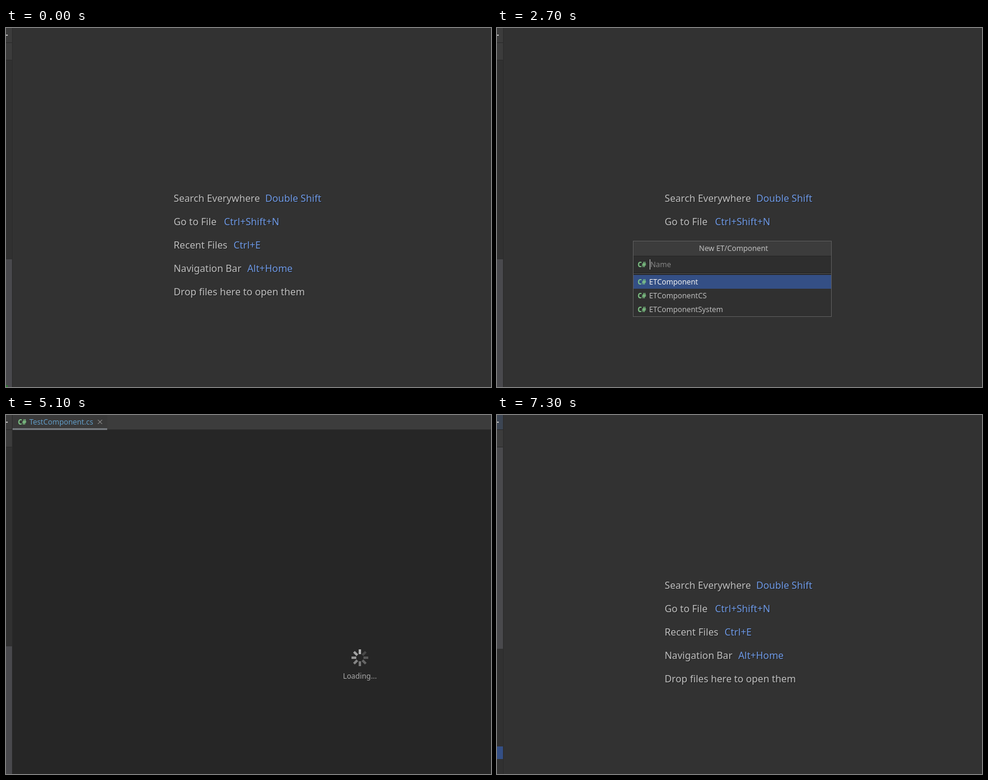
Animation of 810x599 px, one loop 8 s. Source, as an HTML page with a canvas:

```html
<!DOCTYPE html>
<html lang="en">
<head>
<meta charset="utf-8">
<title>New component</title>
<style>
html, body { margin: 0; width: 100%; height: 100%; overflow: hidden; background: #323232; }
canvas { display: block; width: 810px; height: 599px; }
</style>
</head>
<body>
<canvas id="stage" width="810" height="599"></canvas>
<script>
const g = document.getElementById('stage').getContext('2d');
const LOOP = 8000;
const SANS = '"Noto Sans", "Open Sans", sans-serif';
const MONO = '"Noto Sans Mono", "DejaVu Sans Mono", monospace';
const UI = `12.3px ${SANS}`;
const CODE = `13.333px ${MONO}`;
const GREY = '#bbbbbb', BLUE = '#6c95eb', PURPLE = '#b796fa', ICON = '#aeb3b8';

function rect(x, y, w, h, color) {
  g.fillStyle = color;
  g.fillRect(x, y, w, h);
}

function frame(x, y, w, h, color) {
  g.strokeStyle = color;
  g.lineWidth = 1;
  g.strokeRect(x + .5, y + .5, w - 1, h - 1);
}

function text(s, x, y, color = GREY, font = UI, align = 'left') {
  g.font = font;
  g.textAlign = align;
  g.fillStyle = color;
  g.fillText(s, x, y);
}

function path(points, color, width = 1, close = false) {
  g.beginPath();
  points.forEach(([x, y], i) => i ? g.lineTo(x, y) : g.moveTo(x, y));
  if (close) g.closePath();
  g.strokeStyle = color;
  g.lineWidth = width;
  g.stroke();
}

function disc(x, y, r, color) {
  g.beginPath();
  g.arc(x, y, r, 0, Math.PI * 2);
  g.fillStyle = color;
  g.fill();
}

function sharp(x, y) {
  text('C#', x, y, '#84cf8c', `bold 11.8px ${MONO}`);
}

// Left edge of the neighbouring tool window
function strip(t) {
  const focused = (t >= 400 && t < 1400) || t >= 7200;
  rect(0, 0, 10, 24, focused ? '#3c4553' : '#3c3c3c');
  rect(0, 11, 3, 2, '#b4b4b4');
  rect(0, 24, 10, 1, '#2a2a2a');
  rect(0, 25, 10, 28, '#3c3c3c');
  rect(0, 53, 10, 1, '#2a2a2a');
  rect(0, 54, 10, 545, '#313131');
  if (t >= 7300) {
    rect(0, 54, 10, 336, '#49494c');
    rect(0, 553, 10, 21, '#344f85');
  } else {
    const top = t >= 5400 && t < 6900 ? 383 : 386;
    rect(0, top, 10, 599 - top, '#49494d');
  }
  if (t < 400) rect(0, 596, 3, 3, '#2f7a35');
  rect(10, 0, 1, 599, '#2b2b2b');
}

const hints = [
  ['Search Everywhere', 'Double Shift', 433],
  ['Go to File', 'Ctrl+Shift+N', 364],
  ['Recent Files', 'Ctrl+E', 380],
  ['Navigation Bar', 'Alt+Home', 403],
  ['Drop files here to open them', '', 0]
];

function welcome() {
  const font = `16.2px ${SANS}`;
  const shaded = (s, x, y, color) => {
    text(s, x + 1, y + 1, '#1d1d1d', font);
    text(s, x, y, color, font);
  };
  hints.forEach(([label, key, x], i) => {
    const y = 290 + i * 39;
    shaded(label, 280, y, '#c0c0c0');
    shaded(key, x, y, '#6f9ae6');
  });
}

function page(y, filled) {
  if (filled) {
    rect(256, y - 6, 7, 13, ICON);
    rect(253, y - 3, 10, 10, ICON);
    for (let i = 0; i < 3; i++) rect(255, y - 1 + i * 3, 6, 1, '#303030');
  } else {
    path([[254, y - 5], [259, y - 5], [262, y - 2], [262, y + 5], [254, y + 5]], '#d0d0d0', 1.6, true);
    path([[259, y - 5], [259, y - 2], [262, y - 2]], '#d0d0d0');
  }
}

function shader(y) {
  disc(258, y, 7, '#c6c6c6');
  g.save();
  g.beginPath();
  g.arc(258, y, 6, 0, Math.PI * 2);
  g.clip();
  for (let i = -2; i <= 2; i++)
    for (let j = -2; j <= 2; j++)
      if ((i + j) % 2) rect(256.5 + i * 3, y - 1.5 + j * 3, 3, 3, '#303030');
  g.restore();
}

const icons = {
  sharp: y => sharp(251, y + 5),
  brand: y => disc(258, y, 6, '#c6c6c6'),
  shader,
  json: y => page(y, false),
  table(y) {
    frame(251, y - 6, 14, 11, ICON);
    for (let i = 0; i < 3; i++) {
      rect(253, y - 4 + i * 3, 2, 1, ICON);
      rect(256, y - 4 + i * 3, 7, 1, ICON);
    }
  },
  file: y => page(y, true),
  scratch(y) {
    page(y, true);
    disc(262, y - 4, 4, '#4a78c4');
    path([[262, y - 6], [262, y - 4], [264, y - 4]], '#e0e0e0');
  },
  folder(y) {
    rect(252, y - 5, 6, 3, ICON);
    rect(252, y - 3, 12, 9, ICON);
    rect(259, y + 1, 7, 7, '#303030');
    rect(262, y + 1, 2, 6, ICON);
    rect(260, y + 3, 6, 2, ICON);
  }
};

const menuItems = [
  ['Add Existing Item...', 347],
  ['Class/Interface', 372, 'sharp'],
  ['ET/Component', 392, 'sharp'],
  ['ET/Entity', 412, 'sharp'],
  ['ET/Server', 432, 'sharp'],
  ['Ovrel Script', 457, 'brand'],
  ['Ovrel Shader', 477, 'shader'],
  ['appsettings.json File', 502, 'json'],
  ['Resources (.resx)', 527, 'table'],
  ['File', 552, 'file'],
  ['New Scratch File', 572, 'scratch'],
  ['Directory', 592, 'folder']
];

function panel(x, y, w, h, title) {
  rect(x, y, w, h, '#303030');
  rect(x, y, w, 25, '#3c3c3c');
  rect(x, y + 25, w, 1, '#272727');
  frame(x, y, w, h, '#5c5c5c');
  text(title, x + w / 2 + 2, y + 17, '#c0c0c0', UI, 'center');
}

function menu(selected) {
  panel(237, 308, 298, 310, 'New in This Directory');
  for (const y of [359, 444, 489, 514, 539]) rect(238, y, 296, 1, '#3a3a3a');
  menuItems.forEach(([label, y, icon], i) => {
    const on = i === selected;
    if (on) rect(238, y - 10, 296, 20, '#344f85');
    if (icon) icons[icon](y);
    text(label, 272, y + 4, on ? '#f0f0f0' : GREY);
  });
  text('Ctrl+Alt+Shift+Insert', 395, 576, '#8c8c8c');
}

function dialog(t) {
  panel(227, 355, 332, 127, 'New ET/Component');
  rect(228, 381, 330, 27, '#2e2e2e');
  rect(228, 408, 330, 1, '#1f1f1f');
  rect(228, 409, 330, 1, '#4a4a4a');
  rect(228, 411, 330, 1, '#262626');
  sharp(235, 399);
  const typed = t >= 3900;
  if (typed) text('TestComponent', 255, 399);
  else text('Name', 256, 399, '#858585');
  const caret = t < 3100 || (t >= 3600 && t < 4400);
  if (caret) rect(typed ? 347 : 255, 386, 1, 17, '#d0d0d0');
  rect(228, 412, 330, 23, '#344f85');
  ['ETComponent', 'ETComponentCS', 'ETComponentSystem'].forEach((s, i) => {
    const y = 428 + i * 23;
    sharp(235, y);
    text(s, 254, y, i ? GREY : '#f0f0f0');
  });
}

function tab(loaded, active) {
  rect(11, 0, 799, 24, '#3c3c3c');
  rect(11, 0, 158, 24, '#393939');
  rect(11, 24, 799, 1, '#2b2b2b');
  rect(11, 22, 158, 3, active ? '#3d66b4' : '#73777c');
  sharp(20, 16);
  text('TestComponent.cs', 39, 16, loaded ? '#d1685a' : '#629cc6');
  path([[153.5, 8], [160.5, 15]], '#a8a8a8');
  path([[160.5, 8], [153.5, 15]], '#a8a8a8');
}

function code(x, y, parts) {
  for (const [s, color] of parts) {
    text(s, x, y, color, CODE);
    x += s.length * 8;
  }
}

function fold(y, up) {
  const d = up ? -1 : 1;
  rect(75, y - 5, 9, 10, '#262626');
  path([[75.5, y - 4 * d], [83.5, y - 4 * d], [83.5, y + 2 * d], [79.5, y + 5 * d], [75.5, y + 2 * d]], '#565656', 1, true);
  rect(77, y - 1, 5, 1, '#6a6a6a');
}

function gutterIcons() {
  path([[33, 122], [36, 118.5], [39, 122]], '#5b8fd8', 2);
  rect(35, 124, 2, 8, ICON);
  g.beginPath();
  g.arc(43, 128, 3.3, 0, Math.PI * 2);
  g.strokeStyle = ICON;
  g.lineWidth = 1.8;
  g.stroke();

  g.setLineDash([2, 1]);
  g.beginPath();
  g.arc(40, 165, 5, 0, Math.PI * 2);
  g.strokeStyle = '#b8b8b8';
  g.lineWidth = 1;
  g.stroke();
  g.setLineDash([]);
  path([[38, 164], [40, 167], [42, 164]], '#b8b8b8');
  rect(37, 171, 6, 2, '#b8b8b8');
  rect(38, 174, 4, 2, '#b8b8b8');
}

function source(active) {
  rect(11, 25, 68, 574, '#292a29');
  rect(11, 157, 799, 22, '#232423');
  rect(79, 25, 1, 574, '#484848');
  for (let n = 1; n <= 9; n++)
    text(n, 16, 19 + n * 22 + (n > 3 ? 22 : 0), '#7c7c7c', `12.6px ${MONO}`);
  fold(37);
  fold(125);
  fold(190, true);
  fold(212, true);
  gutterIcons();
  rect(116, 157, 1, 22, '#404040');

  code(85, 41, [['namespace ', BLUE], ['ET', PURPLE]]);
  code(85, 63, [['{', '#c4c4c4']]);
  code(117, 85, [['[', '#c4c4c4'], ['ComponentOf', PURPLE], ['()', '#747474'], [']', '#c4c4c4']]);
  path([[120, 99.5], [126, 99.5], [120, 107.5], [126, 107.5]], '#8c8c8c', 1, true);
  text('0+4 ext methods', 130, 107, '#8a8a8a', `10.4px ${SANS}`);
  code(117, 129, [
    ['public class ', BLUE], ['TestComponent', PURPLE], [': ', '#c4c4c4'], ['Entity', PURPLE],
    [', ', '#c4c4c4'], ['IAwake', PURPLE], [', ', '#c4c4c4'], ['IDestroy', PURPLE]
  ]);
  code(117, 151, [['{', '#c4c4c4']]);
  code(117, 195, [['}', '#c4c4c4']]);
  code(85, 217, [['}', '#b4c8a4']]);
  if (active) rect(148, 159, 2, 18, '#f0f0f0');
}

function loading(t) {
  const fading = t >= 5400;
  g.save();
  g.globalAlpha = fading ? Math.max(0, .3 * (5900 - t) / 400) : 1;
  const head = Math.floor((t - 5100) / 100);
  for (let i = 0; i < 8; i++) {
    const age = (head - i + 8) % 8;
    const shade = fading ? 176 : 178 - age * 15;
    g.save();
    g.translate(591, 405);
    g.rotate(i * Math.PI / 4);
    rect(-2, -14, 4, 8, `rgb(${shade},${shade},${shade})`);
    g.restore();
  }
  text('Loading...', 591, 440, '#a8a8a8', UI, 'center');
  g.restore();
}

function editor(t) {
  const loaded = t >= 5400, active = loaded && t < 6600;
  rect(11, 25, 799, 574, '#262626');
  if (loaded) source(active);
  tab(loaded, active);
  if (t < 5900) loading(t);
}

function draw(t) {
  rect(0, 0, 810, 599, '#323232');
  strip(t);
  if (t >= 5100 && t < 6900) {
    editor(t);
    return;
  }
  welcome();
  if (t >= 1300 && t < 2700) menu(t < 2100 ? 0 : t < 2300 ? 3 : 2);
  if (t >= 2700 && t < 4800) {
    // The dialog hides the lower hints
    dialog(t);
    rect(280, 342, 160, 13, '#323232');
  }
}

const start = performance.now();
function tick() {
  const t = (performance.now() - start) % LOOP;
  draw(Math.floor(t / 100) * 100);
  requestAnimationFrame(tick);
}
tick();
</script>
</body>
</html>
```
